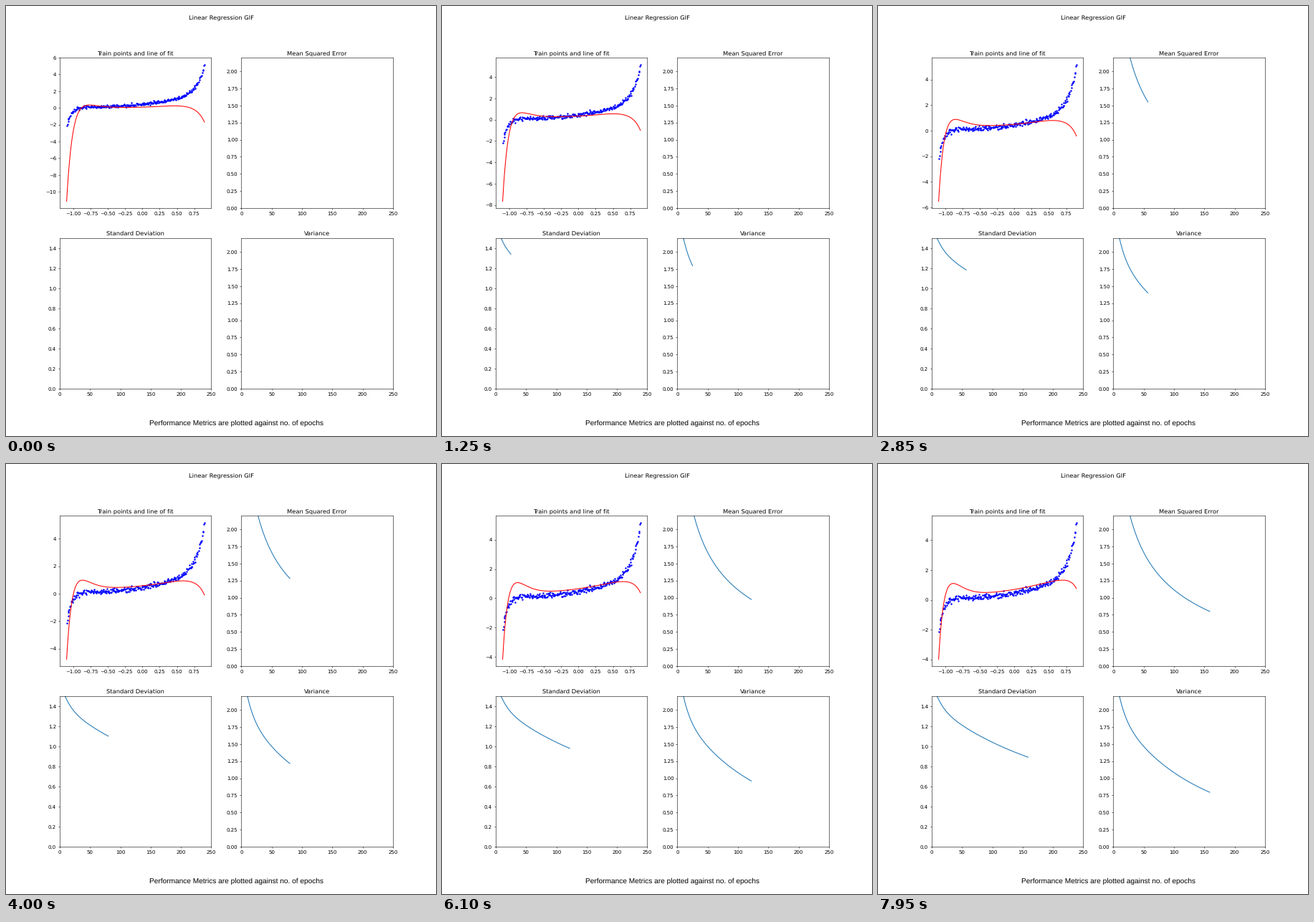
Write a matplotlib script that moves like this. It is 600 by 600 pixels and loops after 8 s.

```python
import numpy as np
import matplotlib.pyplot as plt
from matplotlib.animation import FuncAnimation

SIZE, DPI = 600, 50
FRAMES, INTERVAL = 160, 50
X_MIN, X_MAX = -1.098, 0.897
BOX_W, BOX_H = 211.4, 210

plt.rcParams["text.hinting"] = "none"


def trend(x):
    """Gentle parabola that drops off at the left and shoots up at the right."""
    rise = 3.42 * np.exp((x - X_MAX) / 0.115)
    drop = 2.37 * np.exp((X_MIN - x) / 0.066)
    return 0.48 + 0.9 * x + 0.6 * x**2 + rise - drop


def fit(x, epoch):
    """Line of fit: a quickly fading error and a slow steady drift."""
    final = 0.7 + 0.78 * x + 0.5 * x**2 + 0.4 * x**4 - 1.5 * x**5 - 2 * x**14
    error = -0.46 - 0.08 * x - x**10 * (1.87 - 0.74 * x)
    drift = 0.15 + 0.45 * x + x**4 * (0.93 + 0.6 * x)
    left = 1 - epoch / (FRAMES - 1)
    return final + error * (np.exp(-epoch / 38) - 0.015) - drift * left


rng = np.random.default_rng(7)
count = 260
px = np.linspace(X_MIN, X_MAX, count)
px[1:-1] += rng.uniform(-0.007, 0.007, count - 2)
py = trend(px)
py[1:-1] += rng.normal(0, 0.1, count - 2)
py = np.minimum(py, 5.19)
line_x = np.linspace(X_MIN, X_MAX, 300)

epochs = np.arange(FRAMES)
std = 0.459 + 0.959 * np.exp(-epochs / 200) + 0.244 * np.exp(-epochs / 13)
bias = 1.1 * np.exp(-epochs / 55)
variance = std**2
mse = variance + bias**2

fig = plt.figure(figsize=(SIZE / DPI, SIZE / DPI), dpi=DPI)
fig.suptitle("Linear Regression GIF")
fig.text(200 / SIZE, 1 - 585 / SIZE, "Performance Metrics are plotted against no. of epochs",
         family="Liberation Sans", size=14.55, va="baseline")


def panel(left, bottom, title):
    ax = fig.add_axes([left / SIZE, bottom / SIZE, BOX_W / SIZE, BOX_H / SIZE])
    ax.set_title(title)
    return ax


def metric(left, bottom, title, top, values):
    ax = panel(left, bottom, title)
    ax.set_xlim(0, 250)
    ax.set_ylim(0, top)
    return ax.plot([], [])[0], values


fit_ax = panel(75, 318, "Train points and line of fit")
fit_ax.plot(px, py, "o", color="blue", ms=2.4)
fit_line, = fit_ax.plot([], [], color="red")
pad = 0.05 * (X_MAX - X_MIN)
fit_ax.set_xlim(X_MIN - pad, X_MAX + pad)

metrics = [
    metric(328.4, 318, "Mean Squared Error", 2.2, mse),
    metric(75, 66, "Standard Deviation", 1.5, std),
    metric(328.4, 66, "Variance", 2.2, variance),
]


def update(epoch):
    y = fit(line_x, epoch)
    fit_line.set_data(line_x, y)
    low, high = min(y.min(), py.min()), py.max()
    margin = 0.05 * (high - low)
    fit_ax.set_ylim(low - margin, high + margin)
    for line, values in metrics:
        line.set_data(epochs[:epoch + 1], values[:epoch + 1])
    return [fit_line] + [line for line, _ in metrics]


anim = FuncAnimation(fig, update, frames=FRAMES, interval=INTERVAL,
                     repeat=True, repeat_delay=0, blit=False)
plt.show()
```
